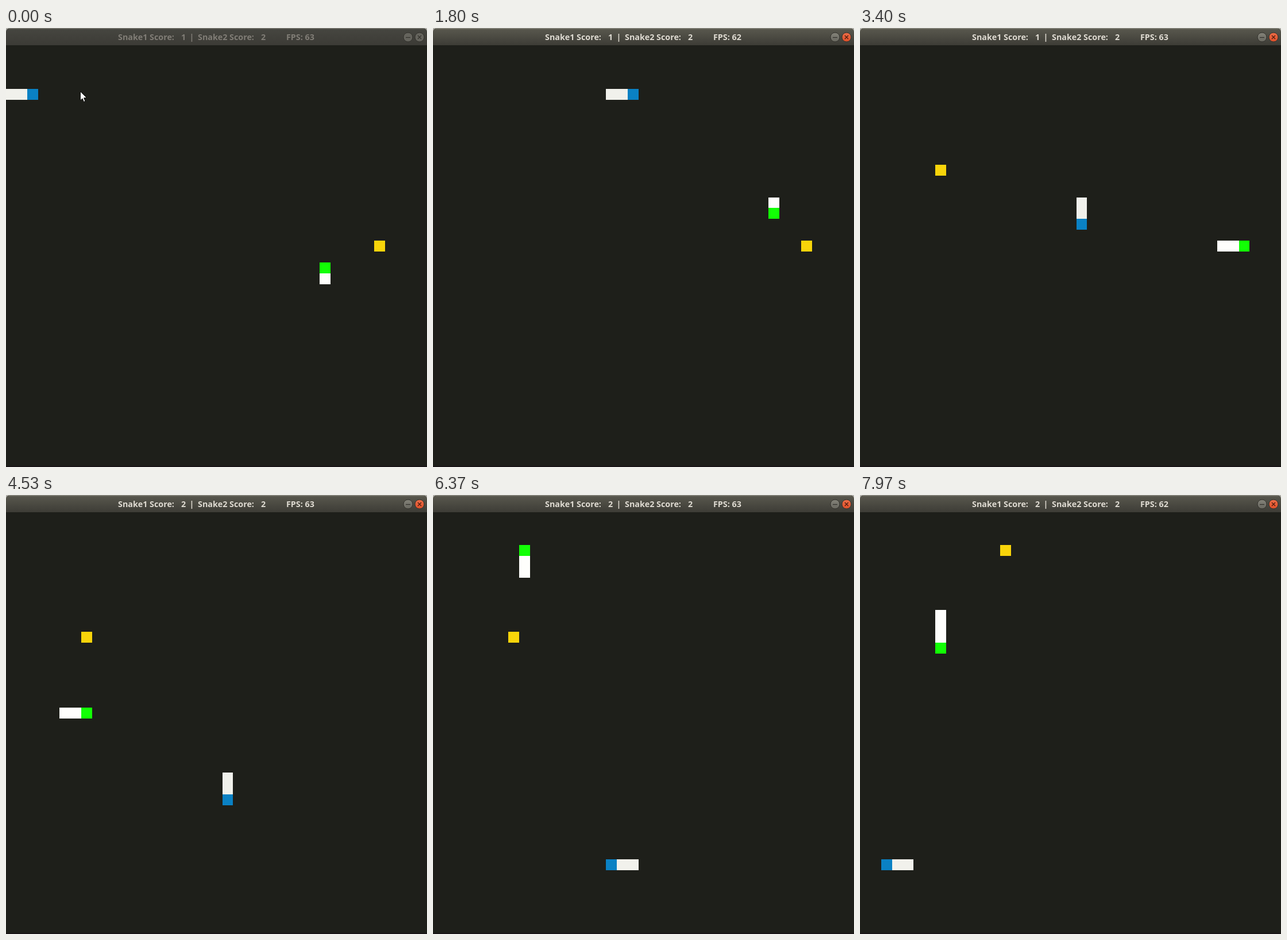
Animation, 733 px wide and 764 px high, one loop 8 s. Source, as an HTML page with a canvas:

```html
<!DOCTYPE html>
<html lang="en">
<head>
<meta charset="utf-8">
<title>Two snakes</title>
<style>
  html, body { margin: 0; width: 100%; height: 100%; overflow: hidden; background: #1e1f1a; }
  canvas { display: block; }
</style>
</head>
<body>
<canvas id="stage" width="733" height="764"></canvas>
<script>
const ctx = document.getElementById('stage').getContext('2d');
const LOOP = 8000, CELL = 18.87, COLS = 38;
const DIRS = { R: [1, 0], L: [-1, 0], U: [0, -1], D: [0, 1] };

// Cells visited from a start cell, e.g. "R18 D30"; columns wrap around.
function walk(x, y, moves) {
  const cells = [[x, y]];
  for (const move of moves.split(' ')) {
    const [dx, dy] = DIRS[move[0]];
    for (let i = +move.slice(1); i > 0; i--) {
      x = (x + dx + COLS) % COLS;
      y += dy;
      cells.push([x, y]);
    }
  }
  return cells;
}

// Each snake: leading tail cells, then its route; beats pair a step with its time in ms.
const lateBeats = [[40, 4530], [41, 4670], [47, 5330], [48, 5470], [55, 6270],
  [56, 6370], [64, 7230], [65, 7370], [70, 7970]];
const blue = {
  head: '#0a81c4', body: '#f1f1ec', lead: 2,
  cells: walk(0, 4, 'R20 D30 R1 U2 L19'),
  beats: [[1, 70], [8, 870], [16, 1800], [20, 2230], [30, 3400], [35, 3970], ...lateBeats]
};
const green = {
  head: '#12ff05', body: '#fefefc', lead: 1,
  cells: walk(29, 21, 'U10 R2 D10 R2 U3 R13 U17 L1 D11'),
  beats: [[1, 200], [6, 800], [7, 900], [15, 1700], [16, 1830], [19, 2200], [26, 3170],
    [28, 3400], [33, 3970], ...lateBeats.map(([n, t]) => [n - 2, t])]
};

function stepAt(beats, t) {
  if (t < beats[0][1]) return 0;
  for (let i = 1; i < beats.length; i++) {
    const [n0, t0] = beats[i - 1], [n1, t1] = beats[i];
    if (t < t1) return Math.floor(n0 + (n1 - n0) * (t - t0) / (t1 - t0) + 1e-6);
  }
  return beats[beats.length - 1][0];
}

function drawCell([col, row], color) {
  const px = c => Math.round(c * CELL - 0.9), py = r => Math.round(r * CELL + 30.4);
  ctx.fillStyle = color;
  ctx.fillRect(px(col), py(row), px(col + 1) - px(col), py(row + 1) - py(row));
}

function drawSnake(snake, step, length) {
  const at = step + snake.lead;
  for (let i = length - 1; i >= 0; i--) {
    drawCell(snake.cells[at - i], i ? snake.body : snake.head);
  }
}

function drawButton(x, color, mark, cross) {
  ctx.beginPath();
  ctx.arc(x, 16, 8, 0, 7);
  ctx.fillStyle = color;
  ctx.fill();
  ctx.lineWidth = 1;
  ctx.strokeStyle = '#33322d';
  ctx.stroke();
  ctx.beginPath();
  if (cross) {
    ctx.moveTo(x - 3, 13); ctx.lineTo(x + 3, 19);
    ctx.moveTo(x + 3, 13); ctx.lineTo(x - 3, 19);
  } else {
    ctx.moveTo(x - 4, 16.5); ctx.lineTo(x + 4, 16.5);
  }
  ctx.lineWidth = 1.3;
  ctx.strokeStyle = mark;
  ctx.stroke();
}

function vertical(top, bottom) {
  const g = ctx.createLinearGradient(0, 1, 0, 30);
  g.addColorStop(0, top);
  g.addColorStop(1, bottom);
  return g;
}

function drawTitleBar(t, active) {
  ctx.fillStyle = '#b5b4ae';
  ctx.fillRect(0, 0, 733, 8);
  ctx.beginPath();
  ctx.roundRect(0, 0.6, 733, 40, [6, 6, 0, 0]);
  ctx.fillStyle = active ? vertical('#59584e', '#3d3c36') : vertical('#464640', '#3c3b36');
  ctx.fill();
  ctx.fillStyle = active ? '#727166' : '#5b5a52';
  ctx.fillRect(5, 1, 723, 1);

  ctx.font = 'bold 14.3px "Noto Sans", "Open Sans", sans-serif';
  ctx.fillStyle = active ? '#dfdbd2' : '#807d76';
  const fps = (t >= 1100 && t < 3100) || t >= 7100 ? 62 : 63;
  const labels = [['Snake1 Score:', 195], [t < 4100 ? 1 : 2, 305], ['|', 319.5],
    ['Snake2 Score:', 334], [2, 444], ['FPS: ' + fps, 488]];
  for (const [text, x] of labels) ctx.fillText(text, x, 21);

  drawButton(700, active ? vertical('#8f8e84', '#5f5e56') : '#65645d', '#34332e', false);
  drawButton(720, active ? vertical('#f37a56', '#d9441c') : '#65645d', active ? '#4a1c10' : '#34332e', true);
}

function drawCursor() {
  ctx.beginPath();
  [[129.5, 110.5], [129.5, 126], [133, 122.8], [135.5, 128.5], [138, 127.4],
    [135.6, 121.8], [140.5, 121.5]].forEach(p => ctx.lineTo(...p));
  ctx.closePath();
  ctx.fillStyle = '#fff';
  ctx.fill();
  ctx.lineWidth = 1;
  ctx.strokeStyle = '#111';
  ctx.stroke();
}

function draw(t) {
  const active = t >= 300;
  drawTitleBar(t, active);
  ctx.fillStyle = '#1e1f1a';
  ctx.fillRect(0, 30, 733, 734);
  ctx.fillStyle = '#191517';
  ctx.fillRect(0, 762, 733, 2);

  const step = stepAt(green.beats, t);
  const eaten = (step >= 27) + (step >= 67);
  drawCell([[34, 18], [7, 11], [13, 3]][eaten], '#f8d40a');
  drawSnake(blue, stepAt(blue.beats, t), 3);
  drawSnake(green, step, 2 + eaten);
  if (!active) drawCursor();
}

const start = performance.now();
function tick() {
  draw((performance.now() - start) % LOOP);
  requestAnimationFrame(tick);
}
tick();
</script>
</body>
</html>
```
